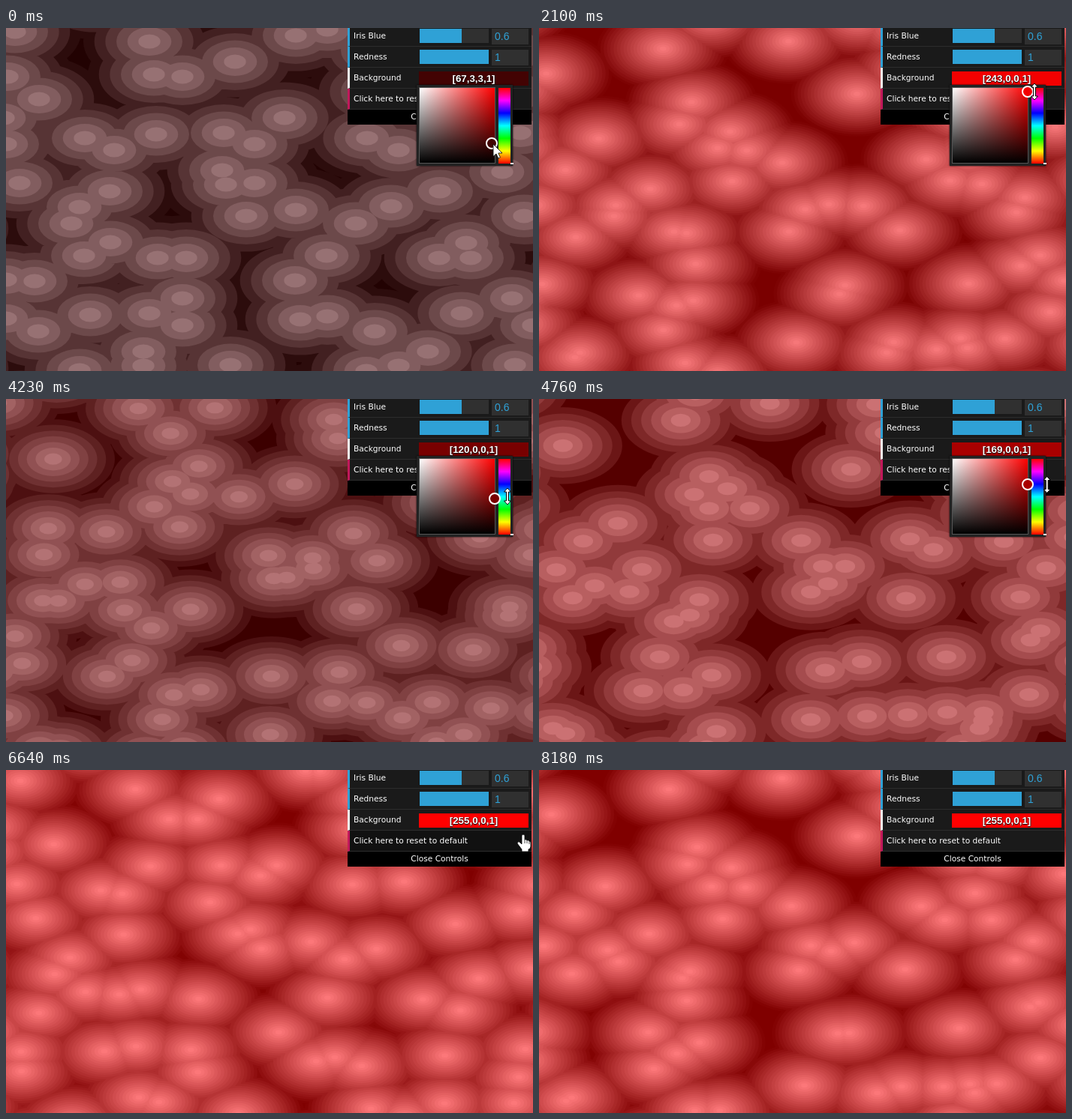
Animation, 702 px wide and 458 px high, one loop 8200 ms. Source, as an HTML page with a canvas:

```html
<!DOCTYPE html>
<html lang="en">
<head>
<meta charset="utf-8">
<title>Cell pattern controls</title>
<style>
html, body { margin: 0; width: 100%; height: 100%; overflow: hidden; background: #400; }
#stage { position: relative; width: 702px; height: 458px; overflow: hidden; cursor: default; }
#stage *, #stage svg { position: absolute; box-sizing: border-box; }
#field { left: 0; top: 0; }
#panel { left: 455px; top: 0; width: 245px; height: 129px; background: #000; color: #eee;
  font: 10.65px/27px "DejaVu Sans", sans-serif; white-space: nowrap; }
.row { left: 0; width: 245px; height: 28px; background: #1a1a1a;
  border-left: 3px solid #2fa1d6; border-bottom: 1px solid #2c2c2c; }
.row span { left: 5px; top: 0; color: #fff; }
.track { left: 93px; top: 4px; width: 92px; height: 19px; background: #303030; }
.track i { left: 0; top: 0; height: 19px; background: #2fa1d6; }
.num { left: 189px; top: 4px; width: 49px; height: 21px; background: #303030; color: #2fa1d6;
  font: 14px/21px "Liberation Sans", Arial, sans-serif; padding-left: 4px; }
#swatch { left: 92px; top: 5px; width: 146px; height: 19px; color: #fff; text-align: center;
  font: bold 13.33px/20px "Liberation Sans", Arial, sans-serif; text-shadow: 0 1px 1px #000, 1px 0 1px #0008; }
#close { left: 0; top: 109px; width: 245px; line-height: 20px; text-align: center; color: #fff; }
#picker { left: 547px; top: 76px; width: 128px; height: 108px; background: #222;
  box-shadow: 0 0 2px #000; }
#sv { left: 3px; top: 3px; width: 102px; height: 102px; border: 1px solid #555;
  background: linear-gradient(transparent, #000), linear-gradient(90deg, #fff, #f00); }
#hue { left: 109px; top: 4px; width: 16px; height: 101px;
  background: linear-gradient(#f00, #f0f, #00f, #0ff, #0f0, #ff0, #f00); }
#mark { left: 125px; top: 104px; width: 4px; height: 2px; background: #fff; }
#knob { width: 16px; height: 16px; border: 2px solid #fff; border-radius: 50%; }
#cursor { left: 0; top: 0; overflow: visible; }
</style>
</head>
<body>
<div id="stage">
  <canvas id="field" width="702" height="458"></canvas>
  <div id="panel">
    <div class="row" style="top:-3px"><span>Iris Blue</span><div class="track"><i style="width:56px"></i></div><div class="num">0.6</div></div>
    <div class="row" style="top:25px"><span>Redness</span><div class="track"><i style="width:92px"></i></div><div class="num">1</div></div>
    <div class="row" style="top:53px;border-left-color:#eee"><span>Background</span><div id="swatch"></div></div>
    <div class="row" id="reset" style="top:81px;border-left-color:#c2185b"><span>Click here to reset to default</span></div>
    <div id="close">Close Controls</div>
  </div>
  <div id="picker">
    <div id="sv"></div><div id="hue"></div><div id="mark"></div><div id="knob"></div>
  </div>
  <svg id="cursor" width="24" height="28" stroke-linejoin="round">
    <path id="arrow" d="M0 0V16.5L4 13L6.8 19L9.4 17.8L6.8 12H12Z" fill="#fff" stroke="#000" stroke-width=".8"/>
    <path id="resize" d="M0-11L4.5-6H1.5V6H4.5L0 11L-4.5 6H-1.5V-6H-4.5Z" fill="#fff" stroke="#000"/>
    <g id="hand">
      <path d="M-2-10Q0-12 2-10V-4Q4-5 5-3Q7-4 8-2Q10-2.500 10 0V5Q10 8 7 9V12H-2V9L-8 1Q-8-2-5-1L-2 2Z" fill="#fff" stroke="#000" stroke-width=".8"/>
      <path d="M2-4V1M5-3V1M8-2V2" fill="none" stroke="#000" stroke-width=".7"/>
    </g>
  </svg>
</div>
<script>
const LOOP = 8200, RX = 88, RY = 57;
const $ = id => document.getElementById(id);
const ctx = $('field').getContext('2d');
const rnd = n => { const s = Math.sin(n * 127.1 + 3.7) * 43758.5453; return s - Math.floor(s); };

// Cell centres at time zero, x and y in turn
const seeds = [
  12,5, 191,18, 386,10, 428,2, 305,45, 197,62, 235,65, 2,65, 44,95, 371,120,
  -3,120, 0,155, 105,147, 144,163, 200,142, 290,140, 331,155, 481,147, 523,163, 685,140,
  18,207, 138,218, 98,239, 87,261, 288,190, 293,209, 331,207, 320,251, 386,243, 466,261,
  513,238, 578,218, 661,192, 690,251, 139,286, 104,304, 202,307, 240,307, 427,304, 577,307,
  619,307, 613,287, 0,336, 38,338, 385,337, 235,361, 674,361, 0,388, 112,383, 191,381,
  235,397, 43,405, 392,389, 428,385, 607,381, 491,405, 702,397, 183,432, 183,451, 98,457,
  299,450, 562,432, 523,451, 480,458, 678,450
];
const cells = [];
const addCell = (x, y) => {
  const n = cells.length;
  cells.push({ x, y, px: 6.283 * rnd(n), py: 6.283 * rnd(n + 200) });
};
for (let i = 0; i < seeds.length; i += 2) addCell(seeds[i], seeds[i + 1]);
for (let i = 0; i < 8; i++) {
  addCell(i * 98 + 20, 505);
  addCell(i * 98 + 20, -42);
  addCell(-70, i * 62 + 20);
  addCell(770, i * 62 + 20);
  addCell(490 + i % 4 * 60, i < 4 ? 30 : 85);
}

// Runs of picture changes: first, last, count
const steps = [0];
for (const [a, b, n] of [
  [150, 870, 6], [990, 1140, 2], [1290, 1410, 2], [1680, 1800, 2], [2100, 3030, 8],
  [3180, 3550, 3], [3850, 4230, 4], [4360, 4760, 4], [4910, 5390, 5], [5540, 5810, 3],
  [6090, 6640, 5], [6780, 7050, 2], [7200, 7590, 4], [7910, 8180, 3]
]) for (let i = 0; i < n; i++) steps.push(Math.round(a + (b - a) * i / (n - 1)));

const red = [[0, 67], [870, 168], [2100, 243], [4230, 120], [5390, 227], [5700, 255]];
const bands = [[0, 6], [870, 8.5], [2100, 20], [4230, 7.5], [5390, 5.7], [6640, 20]];
const mouseX = [[0, 649], [870, 657], [2100, 660], [4230, 668], [5390, 687], [6640, 689]];
const mouseY = [[0, 155], [870, 108], [2100, 85], [4230, 130], [5390, 96], [5700, 80], [6640, 97]];

function at(keys, t) {
  const i = keys.findIndex(k => k[0] > t);
  if (i < 0) return keys[keys.length - 1][1];
  const [a, v] = keys[i - 1], [b, w] = keys[i];
  return v + (w - v) * (t - a) / (b - a);
}

function drawField(t, rgb) {
  const n = at(bands, t), w = t * .002;
  const pts = cells.map(c => [
    c.x + 32 * (Math.sin(w + c.px) - Math.sin(c.px)),
    c.y + 20 * (Math.sin(w + c.py) - Math.sin(c.py))
  ]);
  const tint = v => `rgb(${rgb.map((c, i) => Math.round(c / 2 + v * [128, 122, 124][i]))})`;
  ctx.fillStyle = tint(0);
  ctx.fillRect(0, 0, 702, 458);
  for (let k = Math.floor(n); k > 0; k--) {
    const r = k / n;
    ctx.fillStyle = tint(1 - (k - .5) / n);
    ctx.beginPath();
    for (const [x, y] of pts) {
      ctx.moveTo(x + RX * r, y);
      ctx.ellipse(x, y, RX * r, RY * r, 0, 0, 6.2832);
    }
    ctx.fill();
  }
}

const show = (id, on) => { $(id).style.display = on ? '' : 'none'; };

function render(t) {
  const r = Math.round(at(red, t)), g = Math.max(0, Math.round(3 - t / 200));
  drawField(t, [r, g, g]);
  const color = `rgb(${r},${g},${g})`;
  $('swatch').textContent = `[${r},${g},${g},1]`;
  $('swatch').style.background = $('knob').style.background = color;
  $('knob').style.left = 96 - 100 * g / r + 'px';
  $('knob').style.top = 96 - 100 * r / 255 + 'px';
  show('picker', t < 6090);
  $('reset').style.background = t > 5300 && t < 7590 ? '#111' : '#1a1a1a';
  show('arrow', t < 2000);
  show('resize', t >= 2000 && t < 4900);
  show('hand', t >= 4900 && t < 7590);
  $('cursor').style.transform = `translate(${at(mouseX, t)}px,${at(mouseY, t)}px)`;
}

let last = -1;
const start = performance.now();
function tick() {
  const now = (performance.now() - start) % LOOP;
  const t = steps.filter(s => s <= now).pop();
  if (t !== last) render(last = t);
  requestAnimationFrame(tick);
}
tick();
</script>
</body>
</html>
```
